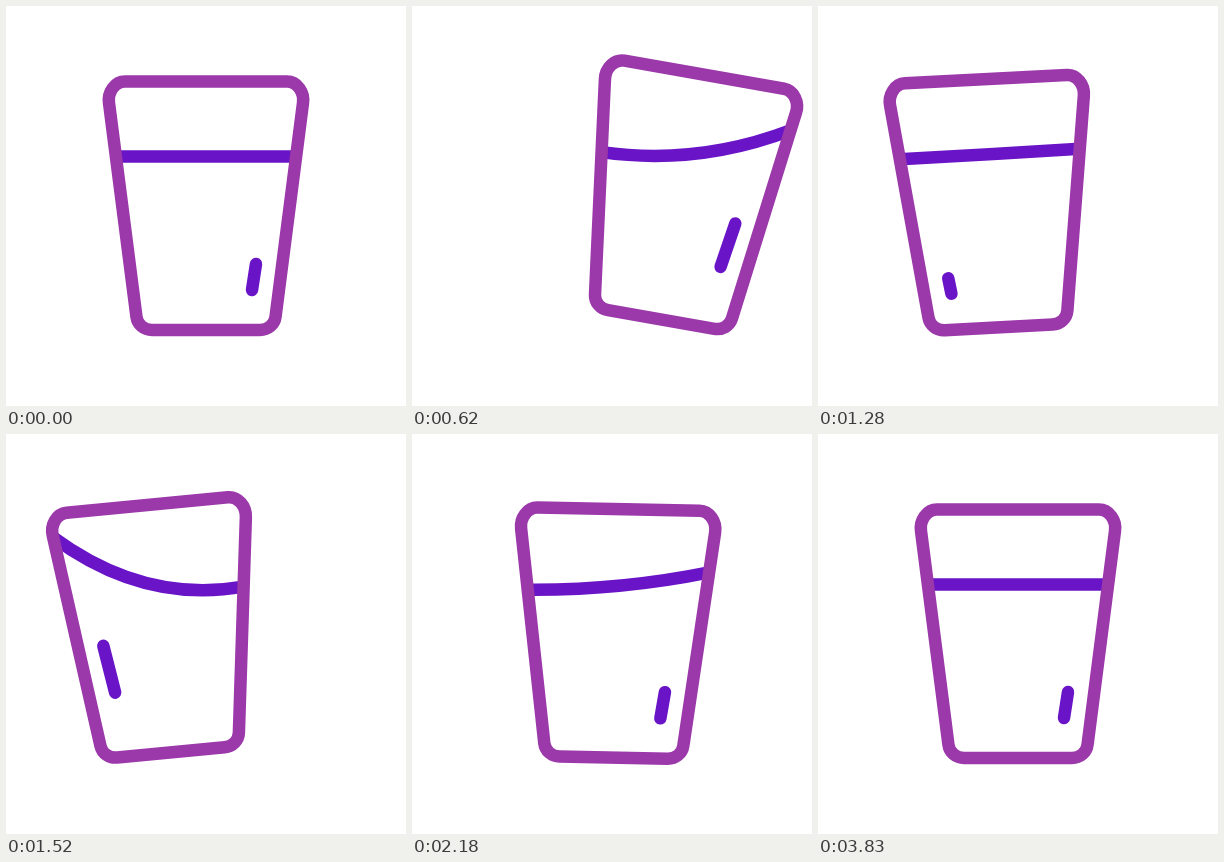
An HTML page with a canvas for the animation above (3.89 s loop, 400 px wide and 400 px high).

```html
<!DOCTYPE html>
<html lang="en">
<head>
<meta charset="utf-8">
<title>Swaying glass</title>
<style>
  html, body { margin: 0; width: 100%; height: 100%; overflow: hidden; background: #fff; }
  canvas { display: block; width: 100vmin; height: 100vmin; }
</style>
</head>
<body>
<canvas id="stage" width="400" height="400"></canvas>
<script>
const ctx = document.getElementById('stage').getContext('2d');
const LOOP = 3890, START = 230, STEP = 30;
const GLASS = '#9b38aa', LIQUID = '#6a14c7';
const SURFACE = -49.5;

// Turning points of each motion as [time, value].
const slide = [[200, 0], [920, 78], [1440, -56], [1810, 20], [2330, 0]];
const tilt = [[200, 0], [920, 11], [1440, -7], [1810, 5.75], [2330, 0]];
const shine = [[200, 0], [1020, 1.1], [1480, -2.45], [1880, 0.3], [2400, -0.17], [2600, 0]];

// The liquid follows the glass, then settles in ever smaller swings.
const slosh = [[300, 0], [1070, 50], [1500, -52]];
for (let n = 0; n < 4; n++) slosh.push([2080 + 400 * n, 18 * (-0.55) ** n]);
slosh.push([3680, 0]);

const smooth = u => u * u * (3 - 2 * u);
const launch = u => smooth(1 - (1 - u) ** 1.9);

// Eases from one turning point to the next; the first move is a quick launch.
function track(keys, t) {
  const next = keys.findIndex(([time]) => time > t);
  if (next < 0) return keys[keys.length - 1][1];
  if (next === 0) return keys[0][1];
  const [t0, a] = keys[next - 1], [t1, b] = keys[next];
  const ease = next === 1 ? launch : smooth;
  return a + (b - a) * ease((t - t0) / (t1 - t0));
}

const wallX = y => 97 - (y + 103) * 0.1285;

// Reach 0 is the resting mark; it grows upward and vanishes at the bottom.
function drawShine(reach, side) {
  const top = 58 - 45 * reach, bottom = Math.min(88, 84 - 24 * reach);
  if (bottom - top < 0.5) return;
  const x = y => side * (50 - (y - 58) * 0.154);
  ctx.lineCap = 'round';
  ctx.beginPath();
  ctx.moveTo(x(top), top);
  ctx.lineTo(x(bottom), bottom);
  ctx.stroke();
}

// Positive swing lifts the right end, negative the left one.
function drawSurface(swing) {
  const left = SURFACE + (swing > 0 ? 0.54 * swing : swing);
  const right = SURFACE - (swing > 0 ? swing : 0.3 * swing);
  ctx.lineCap = 'butt';
  ctx.beginPath();
  ctx.moveTo(-wallX(left), left);
  ctx.quadraticCurveTo(0.25 * swing, SURFACE + 0.45 * Math.abs(swing), wallX(right), right);
  ctx.stroke();
}

function drawGlass() {
  ctx.beginPath();
  ctx.moveTo(-81, -124.5);
  ctx.lineTo(81, -124.5);
  ctx.bezierCurveTo(91, -124.5, 98.5, -114, 97, -103);
  ctx.lineTo(69.5, 111);
  ctx.bezierCurveTo(68.5, 118.5, 62, 124, 54, 124);
  ctx.lineTo(-54, 124);
  ctx.bezierCurveTo(-62, 124, -68.5, 118.5, -69.5, 111);
  ctx.lineTo(-97, -103);
  ctx.bezierCurveTo(-98.5, -114, -91, -124.5, -81, -124.5);
  ctx.closePath();
  ctx.stroke();
}

function draw(now) {
  const time = now % LOOP;
  const t = time < START ? 0 : START + Math.floor((time - START) / STEP) * STEP;
  const x = track(slide, t);
  const lift = 0.08 * Math.abs(x) + 0.0006 * x * x;
  const reach = track(shine, t);

  ctx.setTransform(1, 0, 0, 1, 0, 0);
  ctx.fillStyle = '#fff';
  ctx.fillRect(0, 0, 400, 400);
  ctx.translate(200 + x, 200 - lift);
  ctx.rotate(track(tilt, t) * Math.PI / 180);

  ctx.lineWidth = 12.5;
  ctx.strokeStyle = LIQUID;
  drawShine(reach, 1);
  drawShine(-reach - 1.34, -1);
  drawSurface(track(slosh, t));
  ctx.strokeStyle = GLASS;
  drawGlass();
}

const begin = performance.now();
function tick() {
  draw(performance.now() - begin);
  requestAnimationFrame(tick);
}
tick();
</script>
</body>
</html>
```
